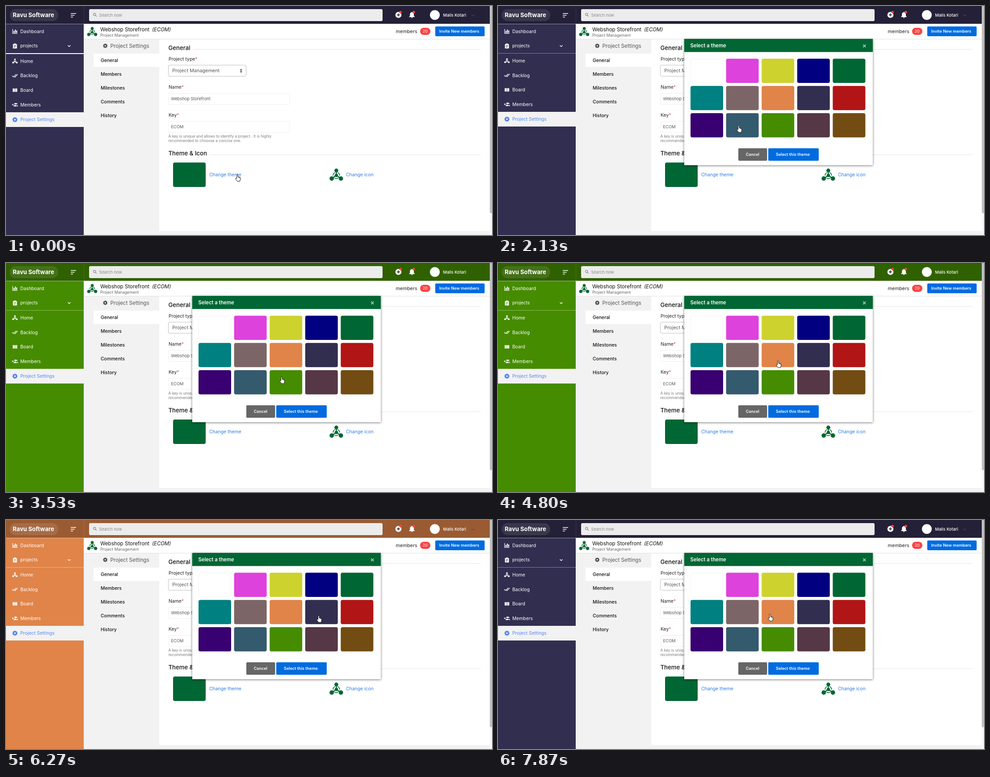
Write an HTML page with a canvas that moves like this. It is 1088 px wide and 515 px high and loops after 8 s.

```html
<!DOCTYPE html>
<html lang="en">
<head>
<meta charset="utf-8">
<title>Project settings</title>
<style>
  html, body { margin: 0; width: 100%; height: 100%; overflow: hidden; background: #fff; }
  canvas { display: block; width: 1088px; height: 515px; }
</style>
</head>
<body>
<canvas id="stage" width="1088" height="515"></canvas>
<script>
const ctx = document.getElementById('stage').getContext('2d');
const LOOP = 8000;
const FONT = 'Inter, "Open Sans", sans-serif';
const GREEN = '#006633', BLUE = '#006be0', LINK = '#2f7de1', PANEL = '#f2f2f2', RED = '#fa4444';
const NAVY = '#322e50', TEAL = '#345a6d', LIME = '#458c00', ORANGE = '#e08449';

const PALETTE = [
  '#ffffff', '#de42dc', '#cdd22f', '#000080', GREEN,
  '#008080', '#7c6566', ORANGE, NAVY, '#b11516',
  '#380070', TEAL, LIME, '#553745', '#724c12'
];

const MODAL_AT = 730, COMPACT_AT = 2130;
const THEMES = [[0, NAVY], [2530, TEAL], [3530, LIME], [5270, ORANGE], [6800, NAVY]];
// time, left, top of the pointer
const POINTER = [
  [0, 513, 378], [70, 506, 378], [270, 504, 379], [1200, 517, 276], [1470, 525, 266],
  [1730, 534, 268], [2530, 589, 251], [2870, 612, 255], [3930, 611, 256], [4330, 623, 220],
  [4800, 622, 219], [5670, 693, 215], [6270, 695, 214], [7870, 604, 211]
];

const current = (steps, t) => steps.filter(s => s[0] <= t).pop();

function rect(x, y, w, h, fill, r = 0, stroke) {
  ctx.beginPath();
  ctx.roundRect(x, y, w, h, r);
  if (fill) { ctx.fillStyle = fill; ctx.fill(); }
  if (stroke) { ctx.strokeStyle = stroke; ctx.lineWidth = 1; ctx.stroke(); }
}

function disc(x, y, r, fill) {
  ctx.beginPath();
  ctx.arc(x, y, r, 0, Math.PI * 2);
  ctx.fillStyle = fill;
  ctx.fill();
}

function line(color, width, ...pts) {
  ctx.beginPath();
  for (let i = 0; i < pts.length; i += 2) ctx.lineTo(pts[i], pts[i + 1]);
  ctx.strokeStyle = color;
  ctx.lineWidth = width;
  ctx.stroke();
}

function shape(d, x, y, fill, stroke, width = 1) {
  const path = new Path2D(d);
  ctx.save();
  ctx.translate(x, y);
  if (fill) { ctx.fillStyle = fill; ctx.fill(path); }
  if (stroke) { ctx.strokeStyle = stroke; ctx.lineWidth = width; ctx.lineJoin = 'round'; ctx.stroke(path); }
  ctx.restore();
}

// y is the middle of the capitals
function text(str, x, y, size, color, weight = 400, style = '') {
  ctx.font = `${style} ${weight} ${size}px ${FONT}`;
  ctx.fillStyle = color;
  ctx.fillText(str, x, y + size * 0.36);
  return x + ctx.measureText(str).width;
}

function label(str, y) {
  const end = text(str, 364, y, 10.4, '#222');
  text('*', end, y, 10.4, '#d9534f');
}

function gear(x, y, r, color) {
  for (let i = 0; i < 8; i++) {
    const a = i * Math.PI / 4;
    line(color, r * 0.45, x, y, x + Math.cos(a) * r, y + Math.sin(a) * r);
  }
  disc(x, y, r * 0.78, color);
}

function gearWithHole(x, y, r, color, hole) {
  gear(x, y, r, color);
  disc(x, y, r * 0.35, hole);
}

// three outer nodes tied to a hub; s = 1 is 30px wide
function nodes(x, y, s, color) {
  const outer = [[0, -10, 4.4], [-10.3, 8, 4.9], [10.3, 8, 4.9]];
  for (const [dx, dy, r] of outer) {
    line(color, 2.2 * s, x, y + s, x + dx * s, y + dy * s);
    disc(x + dx * s, y + dy * s, r * s, color);
  }
  disc(x, y + s, 3.8 * s, color);
  ctx.strokeStyle = color;
  ctx.lineWidth = 1.7 * s;
  for (let i = 0; i < 3; i++) {
    const mid = Math.PI / 2 + i * Math.PI * 2 / 3;
    ctx.beginPath();
    ctx.arc(x, y + s, 7.2 * s, mid - 0.62, mid + 0.62);
    ctx.stroke();
  }
}

const icons = {
  chart(x, y) {
    line('#fff', 1.3, x - 5, y - 5, x - 5, y + 4.5, x + 5.5, y + 4.5);
    [[-2, 4], [1, 7], [4, 5]].forEach(([dx, h]) => rect(x + dx - 1, y + 3 - h, 2, h, '#fff'));
  },
  clip(x, y, bg) {
    rect(x - 4.5, y - 4.5, 9, 10, '#fff', 1);
    rect(x - 1.5, y - 6, 3, 3, '#fff', 1);
    [-1.5, 0.7, 2.9].forEach((dy, i) => line(bg, 0.9, x - 2.5, y + dy, x + (i < 2 ? 2.5 : 1), y + dy));
  },
  nodes(x, y) { nodes(x, y, 0.4, '#fff'); },
  checks(x, y) {
    line('#fff', 1.4, x - 6, y + 0.3, x - 3, y + 3.3);
    line('#fff', 1.4, x - 3, y + 0.3, x, y + 3.3, x + 6, y - 3);
    line('#fff', 1.4, x - 0.6, y + 0.3, x + 2.8, y - 3);
  },
  columns(x, y) {
    [-5, -1.4, 2.2].forEach(dx => rect(x + dx, y - 3.7, 2.9, 7.6, '#fff'));
  },
  people(x, y) {
    line('#fff', 1.2, x - 6.5, y, x - 2.7, y);
    line('#fff', 1.2, x - 4.6, y - 2, x - 4.6, y + 2);
    disc(x + 0.6, y - 2, 1.9, '#fff');
    disc(x + 3.8, y - 2, 1.6, '#fff');
    shape('M-3 4V2.8Q-2 1 .6 1T4 2.8V4zM4.8 4V2.6L4.2 1.2Q6.5 1.3 6.8 2.8V4z', x, y, '#fff');
  }
};

function sidebar(theme, compact) {
  rect(0, 40, 174, 475, theme);
  rect(0, 40, 174, 1, 'rgba(255,255,255,.5)');
  icons.chart(20, 57);
  text('Dashboard', 32, 57, 10.3, '#fff');
  icons.clip(20, 90, theme);
  text('projects', 32, 89.5, 10.3, '#fff');
  line('#fff', 1.4, 138.5, 88.5, 141.5, 91.3, 144.5, 88.5);
  if (compact) rect(0, 106, 174, 1, 'rgba(255,255,255,.4)');
  else rect(0, 106, 174, 2, '#fff');

  const dy = compact ? -0.8 : 0;
  const items = [['Home', 'nodes', 124], ['Backlog', 'checks', 156.6], ['Board', 'columns', 189.2], ['Members', 'people', 221.8]];
  for (const [name, icon, y] of items) {
    icons[icon](20, y + dy);
    text(name, 32, y + dy, 10.3, '#fff');
  }
  const top = compact ? 238 : 239;
  const mid = compact ? 254.5 : 255.7;
  rect(0, top, 174, 33, PANEL);
  gearWithHole(20, mid, 5.6, '#4a7cf0', PANEL);
  text('Project Settings', 32, mid, 10.3, '#5585f2');
}

function topBar(theme) {
  rect(0, 0, 1083, 40, theme);
  rect(0, 0, 1083, 40, 'rgba(0,0,0,.31)');
  rect(174, 0, 1, 40, 'rgba(255,255,255,.1)');
  rect(8, 7, 109, 27, 'rgba(255,255,255,.1)', 13.5);
  text('Ravu Software', 15, 20.5, 13.1, '#fff', 700);
  [12, 8.5, 5].forEach((w, i) => rect(145, 16 + i * 4, w, 1.5, '#fff'));

  rect(186, 7, 657, 27, '#ececed', 3);
  ctx.beginPath();
  ctx.arc(198.3, 19, 2.6, 0, Math.PI * 2);
  ctx.strokeStyle = '#888';
  ctx.lineWidth = 1.1;
  ctx.stroke();
  line('#888', 1.2, 200.2, 21, 203, 23.8);
  text('Search now', 208.5, 20.5, 9.2, '#888');

  disc(878.5, 20, 6.8, '#fff');
  line('#222', 1.6, 875, 20, 882, 20);
  line('#222', 1.6, 878.5, 16.5, 878.5, 23.5);
  disc(883.2, 13.8, 2.8, RED);
  shape('M0-6.5Q4.4-5.5 4.4-1V2L6.2 4.2V5H-6.2V4.2L-4.4 2V-1Q-4.4-5.5 0-6.5zM-1.7 5.6H1.7Q1.5 7.3 0 7.3T-1.7 5.6z', 908.7, 20, '#fff');
  disc(913, 13.8, 2.8, RED);
  disc(960, 20.3, 11, '#fff');
  text('Malis Kotari', 978.5, 21, 9.2, '#fff', 500);
  line('#484a5c', 1.2, 1042, 20, 1045, 22.8, 1048, 20);
}

function header() {
  rect(174, 40, 909, 35, '#fff');
  rect(174, 74, 909, 1, '#e0e0e0');
  nodes(193, 58, 0.74, GREEN);
  text('Webshop Storefront', 211, 53, 11.6, '#111');
  text('(ECOM)', 327, 53, 11.3, '#111', 400, 'italic');
  text('Project Management', 211, 66.3, 8.8, '#666');
  text('members', 872.5, 57, 10.9, '#222');
  rect(927, 49, 23, 16, RED, 8);
  text('20', 932.8, 57, 8.8, '#fff');
  rect(961, 46, 110.5, 22, BLUE, 2);
  text('Invite New members', 969.7, 57, 9.1, '#fff', 600);
}

function subMenu() {
  gearWithHole(222.2, 89.5, 4.8, '#444', PANEL);
  text('Project Settings', 233.5, 89.5, 11.7, '#555');
  rect(196, 107, 147, 30, '#fff');
  ['General', 'Members', 'Milestones', 'Comments', 'History'].forEach((name, i) =>
    text(name, 212, 122 + i * 31, 10.4, '#111', 500));
}

function section(title, y, x) {
  text(title, 363.5, y, 13.2, '#111', 500);
  rect(x, Math.round(y + 2), 1062 - x, 1, '#e6e6e6');
}

function field(value, y) {
  rect(364, y + 0.5, 271, 25, '#fff', 2, '#efefef');
  text(value, 369.5, y + 13, 9.3, '#555');
}

function form() {
  rect(343, 75, 740, 431, '#fff');
  section('General', 94.5, 419);
  label('Project type', 119.5);
  rect(363.5, 133, 174, 25, '#fff', 3, '#bcbcbc');
  text('Project Management', 372.3, 145.5, 10.8, '#555');
  shape('M-2.7-1L0-4.2L2.7-1zM-2.7 1L0 4.2L2.7 1z', 526.2, 145.7, '#333');
  label('Name', 182);
  field('Webshop Storefront', 196);
  label('Key', 245.5);
  field('ECOM', 259);
  text('A key is unique and allows to identify a project . It is highly', 363.5, 293, 8.4, '#7b7b7b');
  text('recommended to choosse a concise one.', 363.5, 303, 8.4, '#7b7b7b');

  section('Theme & Icon', 331.5, 456);
  rect(374, 352, 73, 55, GREEN, 4);
  text('Change theme', 455, 379.5, 10.4, LINK);
  nodes(739.5, 380, 1, GREEN);
  text('Change icon', 761, 379.5, 10.4, LINK);
}

function modal() {
  ctx.save();
  ctx.shadowColor = 'rgba(0,0,0,.55)';
  ctx.shadowBlur = 5;
  ctx.shadowOffsetY = 1;
  rect(417, 74, 422, 284, '#fff');
  ctx.restore();
  rect(417, 74, 422, 29.5, GREEN);
  text('Select a theme', 430.5, 89, 11.2, '#fff', 600);
  line('#a5cbb8', 1.8, 817.2, 86.7, 823.3, 92.8);
  line('#a5cbb8', 1.8, 823.3, 86.7, 817.2, 92.8);
  PALETTE.forEach((color, i) => {
    const x = 431 + (i % 5) * 79.6, y = 118.5 + Math.floor(i / 5) * 61.2;
    if (i) rect(x, y, 73, 54.5, color, 4);
    else rect(x + 0.5, y + 0.5, 72, 53.5, color, 4, '#f3f3f3');
  });
  rect(538, 320, 64.5, 28, '#666', 2);
  text('Cancel', 554.7, 334, 9, '#fff', 600);
  rect(605, 320, 113, 28, BLUE, 2);
  text('Select this theme', 622, 334, 9.1, '#fff', 600);
}

function pointer(x, y) {
  shape('M3.6 9.8V2.3Q3.6.9 4.9.9T6.2 2.3V6.2L9.6 6.8Q11.6 7.2 11.6 9V12L10.4 16.2H4.9L1.2 11.4Q.2 9.8 1.3 9.2Q2.3 8.8 3.6 10.2z', x, y, '#fff', '#111', 1);
  line('#111', 0.7, x + 8, y + 6.8, x + 8, y + 8.8);
  line('#111', 0.7, x + 9.8, y + 7.2, x + 9.8, y + 9);
}

function draw(t) {
  const theme = current(THEMES, t)[1];
  rect(0, 0, 1088, 515, PANEL);
  sidebar(theme, t >= COMPACT_AT);
  topBar(theme);
  header();
  subMenu();
  form();
  rect(1083, 0, 5, 515, '#f7f7f7');
  rect(1083, -4, 5, 470, '#c1c1c1', 2);
  if (t >= MODAL_AT) modal();
  const [, x, y] = current(POINTER, t);
  pointer(x, y);
}

const start = performance.now();
function tick() {
  draw((performance.now() - start) % LOOP);
  requestAnimationFrame(tick);
}
tick();
</script>
</body>
</html>
```
